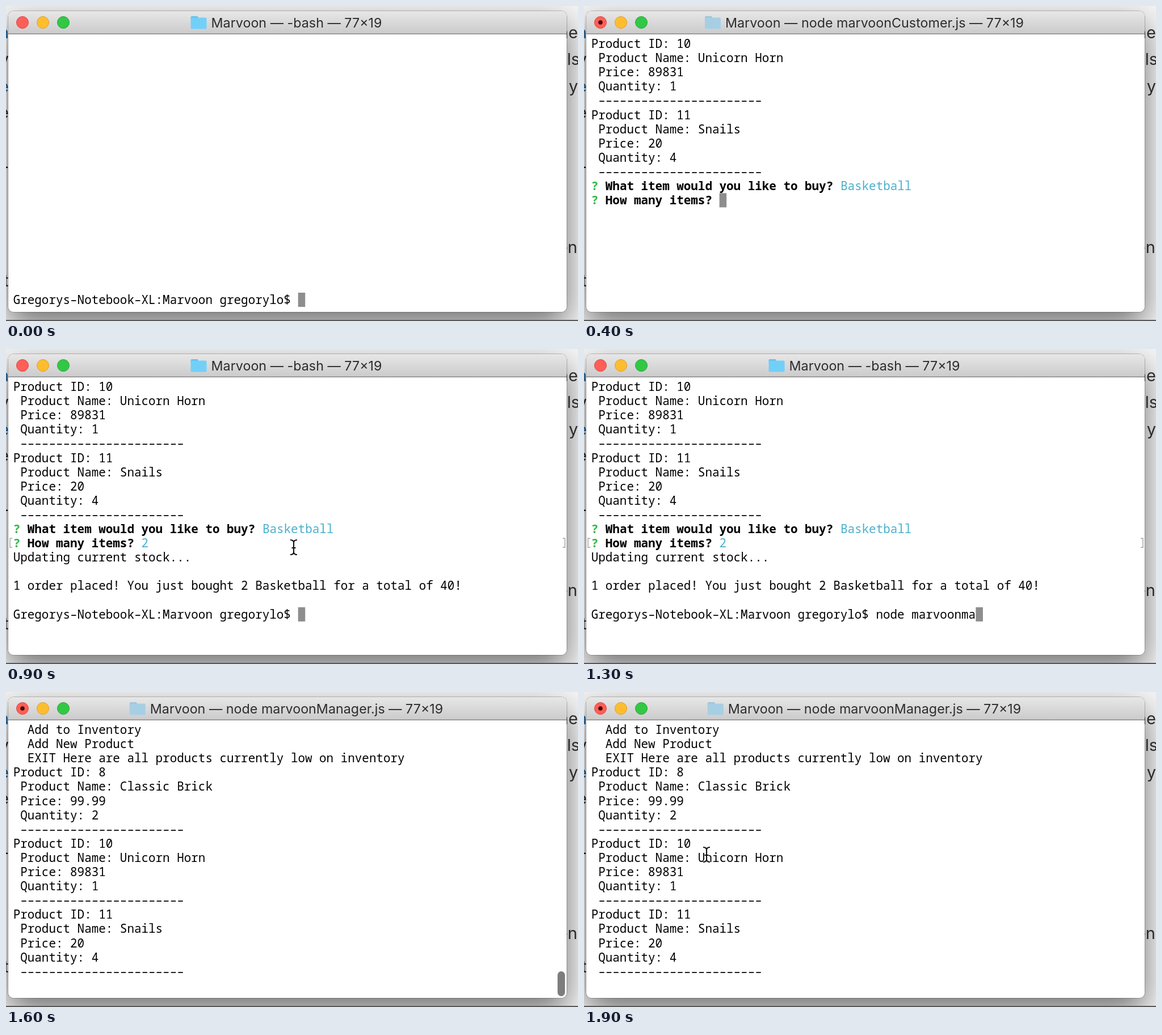
Write an HTML page with a canvas that moves like this. It is 1008 by 556 pixels and loops after 2000 ms.

```html
<!DOCTYPE html>
<html lang="en">
<head>
<meta charset="utf-8">
<title>Terminal session</title>
<style>
  html, body { margin: 0; width: 100%; height: 100%; overflow: hidden; background: #f2f2f2; }
  canvas { display: block; }
</style>
</head>
<body>
<canvas id="stage" width="1008" height="556"></canvas>
<script>
const ctx = document.getElementById('stage').getContext('2d');
const LOOP = 2000, STEP = 100, ROWS = 19;
const COL = 12.55, ROW = 25.1, LEFT = 12.7, TOP = 54.2;
const MONO = '20.92px "Noto Sans Mono", "DejaVu Sans Mono", monospace';
const SANS = 'Inter, Roboto, sans-serif';
const GREEN = '#35b94b', CYAN = '#4bb0cc', GRAY = '#a0a0a0';
const CARET = '█';

// A line is a string or a list of [text, colour, bold] spans.
const APP = 'Marvoon';
const prompt = (typed = '') => `Gregorys-Notebook-XL:${APP} gregorylo$ ${typed}`;
const product = (id, name, price, quantity) => [
  `Product ID: ${id}`, ` Product Name: ${name}`, ` Price: ${price}`,
  ` Quantity: ${quantity}`, ' ' + '-'.repeat(23)
];
const ask = (question, answer = '', colour = CYAN) =>
  [['? ', GREEN, true], [question + ' ', '#000', true], [answer, colour]];
const choices = (names, selected) => names.map((name, i) =>
  i === selected ? [['❯ ' + name, CYAN]] : '  ' + name);

const stock = [...product(10, 'Unicorn Horn', 89831, 1), ...product(11, 'Snails', 20, 4)];
const BUY = 'What item would you like to buy?';
const items = ['Mega Wallop', 'Absinthe', 'Horse Cream', 'Basketball',
  'Flashlight', 'Viking Helmet', 'Classic Brick'];
const browse = (selected, hint) => [...stock, ask(BUY, hint, '#000'),
  ...choices(items, selected), [['(Move up and down to reveal more choices)', GRAY]]];
const picked = [...stock, ask(BUY, 'Basketball')];
const howMany = typed => [...picked, ask('How many items?', typed + CARET, '#000')];
const counted = n => [...picked, ask('How many items?', n)];
const ordered = typed => [...counted('2'), 'Updating current stock...', '',
  '1 order placed! You just bought 2 Basketball for a total of 40!', '',
  prompt(typed + CARET)];
const blank = typed => [...Array(ROWS - 1).fill(''), prompt(typed + CARET)];
const menu = selected => [...ordered('').slice(0, -1), prompt('node marvoonmanager.js'),
  ask('What would you like to do?', '(Use arrow keys)', '#000'),
  ...choices(['View Products for Sale', 'View Low Inventory', 'Add to Inventory',
    'Add New Product', 'EXIT'], selected)];
const lowStock = ['  Add to Inventory', '  Add New Product',
  '  EXIT Here are all products currently low on inventory',
  ...product(8, 'Classic Brick', 99.99, 2), ...stock, ''];

// Each scene holds from its start time until the next one.
const shop = { job: 'node marvoonCustomer.js' }, admin = { job: 'node marvoonManager.js' };
const scenes = [
  { at: 0, lines: blank('') },
  { at: 100, lines: blank('node marv') },
  { at: 200, ...shop, lines: browse(0, '(Use arrow keys)') },
  { at: 300, ...shop, lines: browse(3) },
  { at: 400, ...shop, lines: howMany('') },
  { at: 500, ...shop, lines: howMany('20') },
  { at: 600, bracket: true,
    lines: [...counted('20'), 'Insufficient quantity!', '', prompt(CARET)] },
  { at: 700, ...shop, lines: browse(3) },
  { at: 800, ...shop, lines: howMany('2') },
  { at: 900, bracket: true, pointer: [507, 350], lines: ordered('') },
  { at: 1200, bracket: true, lines: ordered('node') },
  { at: 1300, bracket: true, lines: ordered('node marvoonma') },
  { at: 1400, ...admin, lines: menu(0) },
  { at: 1500, ...admin, lines: menu(1) },
  { at: 1600, ...admin, scrollbar: true, lines: lowStock },
  { at: 1700, ...admin, lines: lowStock },
  { at: 1800, ...admin, pointer: [636, 328], lines: lowStock },
  { at: 1900, ...admin, pointer: [216, 287], lines: lowStock }
];

function text(string, x, y, font, colour, align = 'left') {
  ctx.font = font;
  ctx.fillStyle = colour;
  ctx.textAlign = align;
  ctx.fillText(string, x, y);
}

function shape(x, y, w, h, radius, colour) {
  ctx.beginPath();
  ctx.roundRect(x, y, w, h, radius);
  ctx.fillStyle = colour;
  ctx.fill();
}

function circle(x, y, r, fill, stroke) {
  ctx.beginPath();
  ctx.arc(x, y, r, 0, Math.PI * 2);
  ctx.fillStyle = fill;
  ctx.fill();
  if (!stroke) return;
  ctx.lineWidth = 1;
  ctx.strokeStyle = stroke;
  ctx.stroke();
}

function verticalGradient(y0, y1, from, to) {
  const gradient = ctx.createLinearGradient(0, y0, 0, y1);
  gradient.addColorStop(0, from);
  gradient.addColorStop(1, to);
  return gradient;
}

function drawPage() {
  ctx.fillStyle = '#f6f6f6';
  ctx.fillRect(0, 0, 1008, 556);
  const page = '29px ' + SANS;
  [['a', 57, '#2468a0'], ['v', 104, '#333'], ['e', 152, '#2468a0'], ['e', 198, '#333'],
    ['-', 294, '#111'], ['t', 495, '#333']]
    .forEach(([letter, y, colour]) => text(letter, 5, y, page, colour, 'right'));
  [['ne', 57, 1008], ['ols', 104, 1011], ['y', 152, 1008], ['en', 436, 1007]]
    .forEach(([word, y, x]) => text(word, x, y, page, '#333', 'right'));
}

function drawWindow() {
  ctx.save();
  ctx.shadowColor = 'rgba(0,0,0,.55)';
  ctx.shadowBlur = 56;
  ctx.shadowOffsetY = 22;
  shape(4, 9, 984, 531, 9, '#fff');
  ctx.restore();
  shape(3.2, 8.2, 985.6, 532.6, 10, 'rgba(0,0,0,.28)');
  shape(4, 9, 984, 531, 9, '#fff');
  shape(4, 9, 984, 41, [9, 9, 0, 0], verticalGradient(9, 50, '#e8e7e8', '#cbcacb'));
  ctx.fillStyle = '#858585';
  ctx.fillRect(4, 48.6, 984, 1.4);
  ctx.fillStyle = '#585858';
  ctx.fillRect(0, 554, 1008, 2);
}

function drawTitle(job) {
  const title = `${APP} — ${job || '-bash'} — 77×19`, font = '23.3px ' + SANS;
  ctx.font = font;
  const x = 494 - (ctx.measureText(title).width + 36) / 2;
  shape(x, 18, 13, 8, 2, job ? '#9cc6dc' : '#5fc4ee');
  shape(x, 20.5, 28, 20, 2, job ? '#a7cfe4' : '#72d0f8');
  text(title, x + 36, 37.6, font, '#2e2c2e');

  circle(29, 29, 10.5, '#fc5f58', '#df4640');
  circle(65, 29, 10.5, '#fdbd2f', '#dea032');
  circle(101, 29, 10.5, '#32c845', '#27a934');
  if (job) circle(29, 29, 3.8, '#4a0704');
}

function drawLine(line, row) {
  const y = TOP + row * ROW;
  let column = 0;
  const spans = typeof line === 'string' ? [[line]] : line;
  for (const [string = '', colour = '#000', bold] of spans) {
    const x = LEFT + column * COL;
    const label = string.replace(CARET, '').replaceAll('-', '–');
    text(label, x, y + 19.8, (bold ? 'bold ' : '') + MONO, colour);
    if (string.endsWith(CARET)) {
      ctx.fillStyle = '#8e8e8e';
      ctx.fillRect(x + label.length * COL, y, COL, ROW);
    }
    column += string.length;
  }
}

function drawBrackets() {
  const y = TOP + 11 * ROW + 4;
  ctx.lineWidth = 1.5;
  ctx.strokeStyle = '#a6a6a6';
  for (const [tip, back] of [[11, 7], [981, 985]]) {
    ctx.beginPath();
    ctx.moveTo(tip, y);
    ctx.lineTo(back, y);
    ctx.lineTo(back, y + 16);
    ctx.lineTo(tip, y + 16);
    ctx.stroke();
  }
}

function drawPointer([x, y]) {
  const beam = new Path2D(`M${x - 6} ${y - 13}q6 0 6 5q0-5 6-5
    M${x} ${y - 9}v18M${x - 6} ${y + 13}q6 0 6-5q0 5 6 5M${x - 3.5} ${y + 1}h7`);
  for (const [width, colour] of [[4.5, '#fff'], [2.1, '#111']]) {
    ctx.lineWidth = width;
    ctx.strokeStyle = colour;
    ctx.stroke(beam);
  }
}

function draw(time) {
  const scene = scenes.findLast(({ at }) => at <= time);
  drawPage();
  drawWindow();
  drawTitle(scene.job);
  scene.lines.slice(-ROWS).forEach(drawLine);
  if (scene.bracket) drawBrackets();
  if (scene.scrollbar) shape(972, 493, 13, 44, 6.5, '#7d7d7d');
  if (scene.pointer) drawPointer(scene.pointer);
}

let start;
function tick(now) {
  start ??= now;
  draw(Math.floor((now - start) % LOOP / STEP) * STEP);
  requestAnimationFrame(tick);
}
draw(0);
requestAnimationFrame(tick);
</script>
</body>
</html>
```
